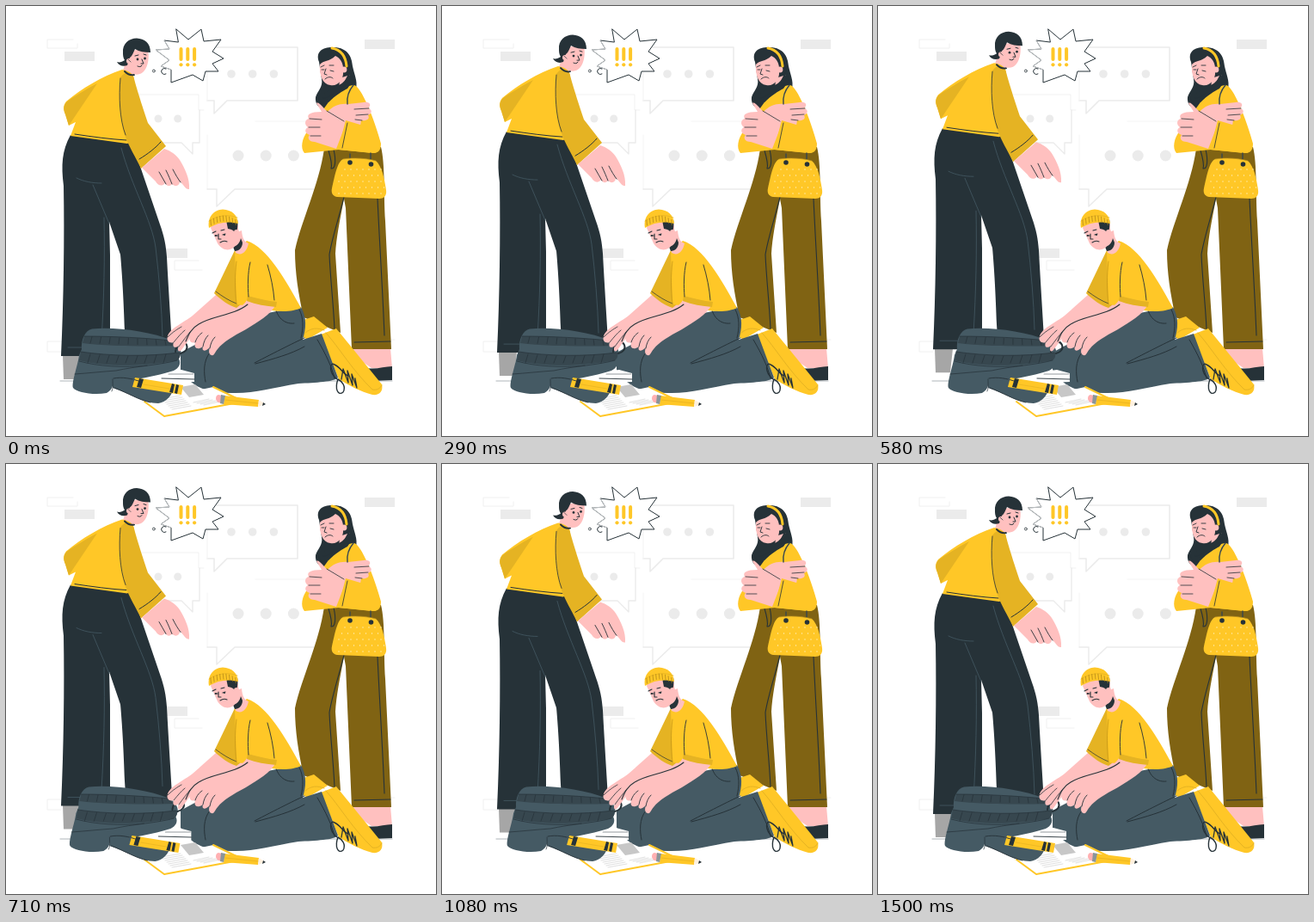
An HTML page that plays this animation: 500 px wide and 500 px high, repeating every 1.54 s.

```html
<!DOCTYPE html>
<html lang="en">
<head>
<meta charset="utf-8">
<style>
html, body { margin: 0; width: 100%; height: 100%; overflow: hidden; background: #fff; }
svg { display: block; width: 100vw; height: 100vh; }
</style>
</head>
<body>
<svg id="stage" viewBox="0 0 500 500"></svg>
<script>
const Y = '#ffc727', Y2 = '#e5b323', SKIN = '#ffc0bf', INK = '#263238',
  SLATE = '#455a64', SLATE2 = '#37474f', OLIVE = '#806313', PALE = '#ebebeb', W = '#fff';

const fill = (c, d) => `<path fill="${c}" d="${d}"/>`;
const line = (c, w, d, f = 'none') =>
  `<path fill="${f}" stroke="${c}" stroke-width="${w}" stroke-linecap="round" stroke-linejoin="round" d="${d}"/>`;
const ink = (d, w = 1) => line(INK, w, d);
const dot = (x, y, r, c) => `<circle cx="${x}" cy="${y}" r="${r}" fill="${c}"/>`;
const bar = (x, y, w, h, c = PALE) => `<rect x="${x}" y="${y}" width="${w}" height="${h}" fill="${c}"/>`;
const group = (id, ...parts) => `<g id="${id}">${parts.join('')}</g>`;
const repeat = (n, f) => Array.from({ length: n }, (_, i) => f(i)).join('');

const backdrop = group('backdrop',
  bar(68, 53, 35, 11), bar(417, 39, 35, 11), bar(176, 282, 35, 11),
  line('#f0f0f0', 1, 'M83 44V49H48V39H78M228 307H196V296H224M66 390H48V402H64M446 388H452'),
  line(PALE, 1.6, 'M234 48H339V110H257L242 125V110H234'),
  line('#f3f3f3', 1, 'M234 48V110'),
  repeat(3, i => dot(262 + i * 24.7, 79, 4.8, PALE)),
  line('#f1f1f1', 1, 'M152 103H224V121H230'),
  line(PALE, 1.4, 'M225 121V159H217V172L204 159H170'),
  repeat(2, i => dot(177 + i * 22.7, 131, 4.5, PALE)),
  line('#f4f4f4', 1, 'M290 134H372M234 150V213'),
  line(PALE, 1.5, 'M372 213H266L245 233V213H234'),
  repeat(3, i => dot(270 + i * 32.2, 174, 6.5, PALE)),
  line('#8d979b', .7, 'M63 436H449'));

const shout = group('shout',
  line(INK, 1, 'M198 27L212 39L227 27L230 41L250 39L240 53L253 61L240 67L247 76L232 76L229 87L217 80L192 89L192 74L180 70L190 63L174 51L190 50L184 40L200 42Z', W),
  line(W, .7, 'M192 74L180 70L190 63L174 51L190 50L184 40'),
  repeat(3, i => line(Y, 4, `M${203.5 + i * 7.8} 50V62`) + dot(203.5 + i * 7.8, 68.3, 2.1, Y)),
  ink('M186 73A3.5 3.5 0 1 0 186 79'),
  line(INK, .8, 'M173.4 75.5A1.5 1.5 0 1 0 170.4 75.5A1.5 1.5 0 1 0 173.4 75.5'));

const man = group('man',
  fill('#a6a6a6', 'M66 406H87L84 434H67Z'),
  fill(INK, 'M75 150L147 160L179 254C184 268 186 278 187 292C189 330 191 360 193 395V410H140L138 378C137 345 135 310 133 289L120 251L121 290V407H64C67 340 68 270 67 209C64 185 65 168 75 150Z'),
  line(SLATE, .8, 'M82 200C90 204 100 206 111 206M101 208L120 253M114 246C115 290 114 340 111 389M134 165C146 210 170 250 174 281C178 315 181 350 182 384M72 397H106'),
  fill(SKIN, 'M139 66H150V79L134 81Z'),
  fill(Y, 'M135 74C111 82 88 96 70 111C66 116 67 121 69 126L73 139L81 135L75 151L141 160L153 150L149 84C147 77 141 75 135 74Z'),
  fill(Y2, 'M106 90C91 98 76 107 70 112C66 117 67 121 69 126L73 139Z'),
  ink('M80 149C100 152 122 155 140 156'),
  fill(Y2, 'M133 83C139 74 147 76 149 85C154 103 160 121 165 136L186 163L157 189C151 176 143 164 139 152C133 136 131 100 133 83Z'),
  ink('M133 84C131 105 132 132 139 150', .8),
  ink('M155 178C165 172 174 165 180 158'),
  fill(SKIN, 'M158 188L184 166C191 168 198 173 202 179C208 189 214 201 213 213C209 214 207 208 202 204C202 209 197 211 193 207C191 210 187 210 185 206C181 211 176 208 174 204Z'),
  ink('M178 193C181 198 183 202 186 207M186 191C189 197 191 202 193 207M194 190C197 196 200 201 203 205', .9),
  ink('M138 76C141 79 145 81 149 80', 2),
  fill(SKIN, 'M141 52L165 50C167 60 165 70 161 75C157 81 148 81 145 76L138 70Z'),
  fill(INK, 'M136 54C135 44 143 37.5 152 37.5C161 38 168 43 168 54C161 54 155 53 150 50C148 54 147 58 144 60L141 69C136 71 131 69 129 65C132 66 135 65 138 63C136 60 136 57 136 54Z'),
  dot(143, 64, 3, SKIN), ink('M142 62L145 65', .7),
  dot(153, 62, 1.4, INK), dot(161.5, 61, 1.4, INK),
  ink('M150 58L154 57M160 56L163 57M158 62L160 67L157 67M153 70C155 71 157 71 158 69'));

const woman = group('woman',
  fill(SKIN, 'M403 398H447L449 421H425C418 416 407 409 402 403Z'),
  fill(INK, 'M420 421C430 423 440 419 449 419V435L425 436Z'),
  fill(OLIVE, 'M370 166L436 164C441 183 439 220 441 250L448 399H402L395 235L393 224C388 250 384 270 383 288L389 380L346 362C340 335 336 310 336 284C344 248 364 208 370 166Z'),
  ink('M393 222C388 243 379 270 376 289C377 315 381 350 382 376M432 224C434 270 438 330 440 383M405 391L447 390M375 168C378 178 379 186 378 189C383 190 384 180 381 167', 1.1),
  fill(INK, 'M364 65C359 52 370 47 382 48C397 49 402 58 403 70C405 80 409 87 407 96C402 110 384 114 375 117C366 123 359 115 360 106C362 99 369 94 367 85Z'),
  fill(Y, 'M384 99C391 96 398 92 405 92C413 94 428 130 436 160C436 169 432 171 425 171L387 167L347 171C342 165 344 154 351 145L372 116Z'),
  fill(SKIN, 'M388 84L400 80C400 91 396 96 387 99Z'),
  fill(INK, 'M387 92C392 90 396 85 398 78L404 86L397 96C391 99 383 104 375 112L370 101Z'),
  fill(SKIN, 'M365 68C369 63 376 65 383 58C388 60 393 66 392 76C393 86 385 94 377 92C368 91 364 80 365 68Z'),
  dot(393, 74, 3.4, SKIN),
  line(Y, 3, 'M379 49C390 51 395 59 396 70'),
  ink('M366 71L370 69M376 69L381 69M367 74L370 74M377 75L381 76M372 73L370 79L373 80M371 85C374 82 378 82 380 84', .9),
  ink('M368 107C372 108 377 105 380 102M363 105C363 109 365 112 368 114', .6),
  fill(SKIN, 'M361 113C364 111 367 117 374 123C380 116 389 113 398 114L416 112C424 111 425 116 421 119C426 120 426 125 421 127C424 132 418 134 413 133L412 139L396 135L384 166L359 158C352 158 350 153 353 150C347 148 347 143 351 141C346 137 348 132 352 131C349 126 354 123 367 123Z'),
  fill(Y, 'M395 133L429 143C437 157 437 171 428 171L386 167Z'),
  ink('M397 136L391 165M353 131L367 132M352 141L365 141M354 151L366 151M405 120L422 119M407 127L421 126M406 132L414 133M373 122C380 126 386 130 393 134', .8),
  line(SLATE2, 1.4, 'M404 92C398 99 396 105 397 114M400 182V172M424 184V171'),
  fill(Y, 'M392 178C404 176 420 177 430 180C437 186 440 200 442 214C443 221 439 224 434 224L385 222C379 221 378 216 379 212C382 199 385 181 392 178Z'),
  repeat(5, r => repeat(8, i => {
    const x = 387 + i * 7 + (r % 2) * 3.5, y = 190 + r * 7;
    return x > 388 - r * 1.5 && x < 437 + r ? dot(x, y, .7, '#fff0bd') : '';
  })),
  line('#b88f1d', .7, 'M392 178C404 176 420 177 430 180'),
  dot(400, 182, 2.8, INK), dot(424.5, 184, 2.8, INK));

const legs = group('legs',
  fill(Y, 'M343 366L358 361L374 374L350 388L343 383Z'),
  line(Y2, 1, 'M348 380C355 374 362 374 370 377'),
  fill(Y, 'M366 382L384 375L402 397L437 440C439 448 434 453 426 452C413 449 397 440 387 434Z'),
  line(Y2, 1, 'M372 380C388 398 403 424 426 446C431 447 435 445 437 441'),
  fill(SLATE, 'M240 379C261 365 306 356 343 350C350 362 349 375 345 388L367 381L386 432C382 437 360 438 340 439C309 444 288 451 262 450C240 450 224 445 215 437L203 423V403C215 396 230 390 240 379Z'),
  ink('M289 415C312 403 340 389 347 386M290 416C312 410 331 405 347 396M341 353C346 362 346 374 343 386M237 403C229 413 230 427 232 437M362 388C372 405 379 420 382 433M313 350C316 365 326 370 335 369'),
  ink('M385 434C374 425 377 413 382 417C389 420 392 428 398 430M386 434C382 445 386 454 392 449C396 442 390 436 386 434', 1.4),
  ink('M390 434L392 422L398 438L397 424L403 441L402 428L408 444L406 433', 1.3));

const papers = group('papers',
  line(Y, 2, 'M161 460L184 477L276 460L241 443', W),
  line('#c9c9c9', .6, repeat(7, i => `M${181 + i * 2} ${457 + i * 2}L${203 + i * 2} ${453 + i * 2}`)
    + repeat(4, i => `M${218 + i * 4} ${461 + i}L${236 + i * 4} ${457 + i}`)),
  fill('#c7c7c7', 'M203 443L220 440L230 452L213 455Z'),
  fill(Y, 'M254 453L294 458L293 466L253 463Z'),
  fill('#ffb0b2', 'M247 452C243 453 243 459 247 461L251 462V453Z'),
  fill('#8a9599', 'M250 452L255 453L253 463L249 462Z'),
  fill('#fff1df', 'M294 458L302 463L293 466Z'), fill(INK, 'M299 461L302 463L298 465Z'),
  line('#e0a91f', .6, 'M255 458L293 462'));

const bag = group('bag',
  fill(W, 'M150 431L204 423L219 427V437L195 438L140 435Z'),
  ink('M181 433L219 434', .9), ink('M189 428L218 428', .5),
  fill(SLATE, 'M124 433C136 431 145 433 157 437L195 444C193 453 186 461 177 462C160 462 143 450 124 444Z'),
  fill(SLATE, 'M88 399C87 388 92 377 100 375.5C127 373 166 378 194 389C203 395 206 403 201 410C204 416 201 421 195 424C182 428 165 432 150 434H126C124 439 125 446 117 450C101 453 82 449 78 444C76 438 83 420 85 406Z'),
  fill(Y, 'M150 432L206 441L204 452L147 443Z'),
  fill(INK, 'M155 433L160 434L157 444L152 443ZM193 439L196 440L194 450L190 449ZM198 440L201 441L199 451L196 450Z'),
  line(Y2, .7, 'M160 440L190 445'),
  ink('M125 433C135 431 146 433 157 437M126 444C142 450 154 458 168 461', .9),
  fill(SLATE2, 'M91 384C125 384 163 386 192 389L199 395C165 396 122 396 89 392ZM87 402C119 407 162 408 202 403C203 407 202 410 199 412C173 417 125 422 85 412Z'),
  line(INK, .7, repeat(9, i => `M${100 + i * 10.6} ${384.5 + i * .5}L${98 + i * 11} ${392 + i * .3}M${98 + i * 11} ${405 + Math.sin(i * .4) * 2}L${95 + i * 11} 415`)),
  ink('M91 384C125 384 163 386 193 389M87 402C120 407 164 408 201 403M85 413C107 419 137 421 164 418M80 428C95 427 113 425 128 424C150 419 182 417 199 412M124 434C124 440 125 444 123 448', .7),
  line(INK, 2, 'M197 402C199 390 207 388 210 394C212 399 208 403 203 404'));

const boy = group('boy',
  fill(SKIN, 'M244 336L282 344C272 358 246 366 222 374C217 382 210 392 204 400C200 404 199 399 201 395C196 399 193 396 195 391C190 393 186 389 188 384C190 375 207 368 217 360Z'),
  ink('M188 385C194 379 199 376 204 373M195 391C200 385 204 380 208 377M201 396C206 389 210 384 214 379', .8),
  fill(Y2, 'M266 284L242 334C250 342 259 348 268 351L282 340L284 292Z'),
  fill(Y, 'M266 285L280 273C304 281 325 318 343 351C333 356 314 357 292 350L268 347Z'),
  line(INK, .7, 'M244 332C252 338 260 343 268 346'),
  fill(SKIN, 'M280 342L314 347C307 360 293 367 279 376C264 384 252 391 246 399C242 404 242 407 239 406C235 405 236 400 237 397C232 402 227 402 229 396C222 401 218 397 220 391C215 393 212 389 214 383C222 367 244 362 258 357C269 353 277 348 280 342Z'),
  ink('M281 347C265 360 239 360 224 370C215 375 212 383 209 390', 1.1),
  ink('M220 391C222 385 225 382 228 380M229 396C230 390 232 386 235 383M237 398C238 392 240 388 243 385', .9),
  fill(Y2, 'M281 337C293 340 304 343 315 344L314 350C302 349 291 347 280 343Z'),
  ink('M284 298C281 310 281 326 282 338M304 301C308 314 311 329 312 342', .9),
  line('#c89a19', .8, 'M268 297C266 314 266 330 268 346'),
  fill(SKIN, 'M262 266L274 261C275 271 277 274 282 276C280 286 274 291 267 287Z'),
  fill(INK, 'M264 280C269 279 272 275 273 270L275 275C275 281 271 285 266 285Z'),
  fill(SKIN, 'M238 258L242 248L267 246C272 258 271 270 267 278C263 285 252 286 246 276Z'),
  fill(INK, 'M256 249L269 248C270 255 269 261 267 265C264 259 261 260 258 259Z'),
  dot(268, 263, 3, SKIN),
  fill(Y, 'M236 258C234 245 242 237 252 236.5C263 237 269 243 270 253C259 250 247 251 236 258Z'),
  line(Y2, .8, 'M236 250C247 243 259 242 269 246'),
  line('#a88016', .7, repeat(9, i => `M${238.5 + i * 3.6} ${255 - Math.sin(i * .38) * 5}l-.6 -6`)),
  ink('M240 264L244 262M250 261L254 260M243 267L246 267M252 266L255 265M247 265L247 271L250 271M249 275C252 273 255 273 257 274', 1.1),
  dot(244, 267, 1.1, INK), dot(254, 266, 1.1, INK));

document.getElementById('stage').innerHTML =
  backdrop + shout + man + woman + legs + papers + bag + boy;

const LOOP = 1540, FPS = 24, CYCLE = 36;
// Sideways shake: offset at every tenth of the cycle.
const shake = [0, -1, 2, -4, 4, -4, 4, -4, 2, -1, 0];

// The CSS "ease" curve, cubic-bezier(.25, .1, .25, 1).
function ease(x) {
  const curve = (a, b, s) => 3 * a * s * (1 - s) ** 2 + 3 * b * s * s * (1 - s) + s ** 3;
  let lo = 0, hi = 1;
  for (let i = 0; i < 20; i++) {
    const mid = (lo + hi) / 2;
    if (curve(.25, .25, mid) < x) lo = mid; else hi = mid;
  }
  return curve(.1, 1, lo);
}

const bobAt = p => -10 * (1 - Math.abs(1 - 2 * p));

function shakeAt(p) {
  const i = Math.floor(p * 10);
  return shake[i] + (shake[i + 1] - shake[i]) * ease(p * 10 - i);
}

const manEl = document.getElementById('man'), bagEl = document.getElementById('bag');
function draw(now) {
  const step = Math.floor((now % LOOP + 5) * FPS / 1000);
  const p = step % CYCLE / CYCLE;
  manEl.setAttribute('transform', `translate(0 ${bobAt(p)})`);
  bagEl.setAttribute('transform', `translate(${shakeAt(p)} 0)`);
}

let start;
function tick(now) {
  start ??= now;
  draw(now - start);
  requestAnimationFrame(tick);
}
draw(0);
requestAnimationFrame(tick);
</script>
</body>
</html>
```
